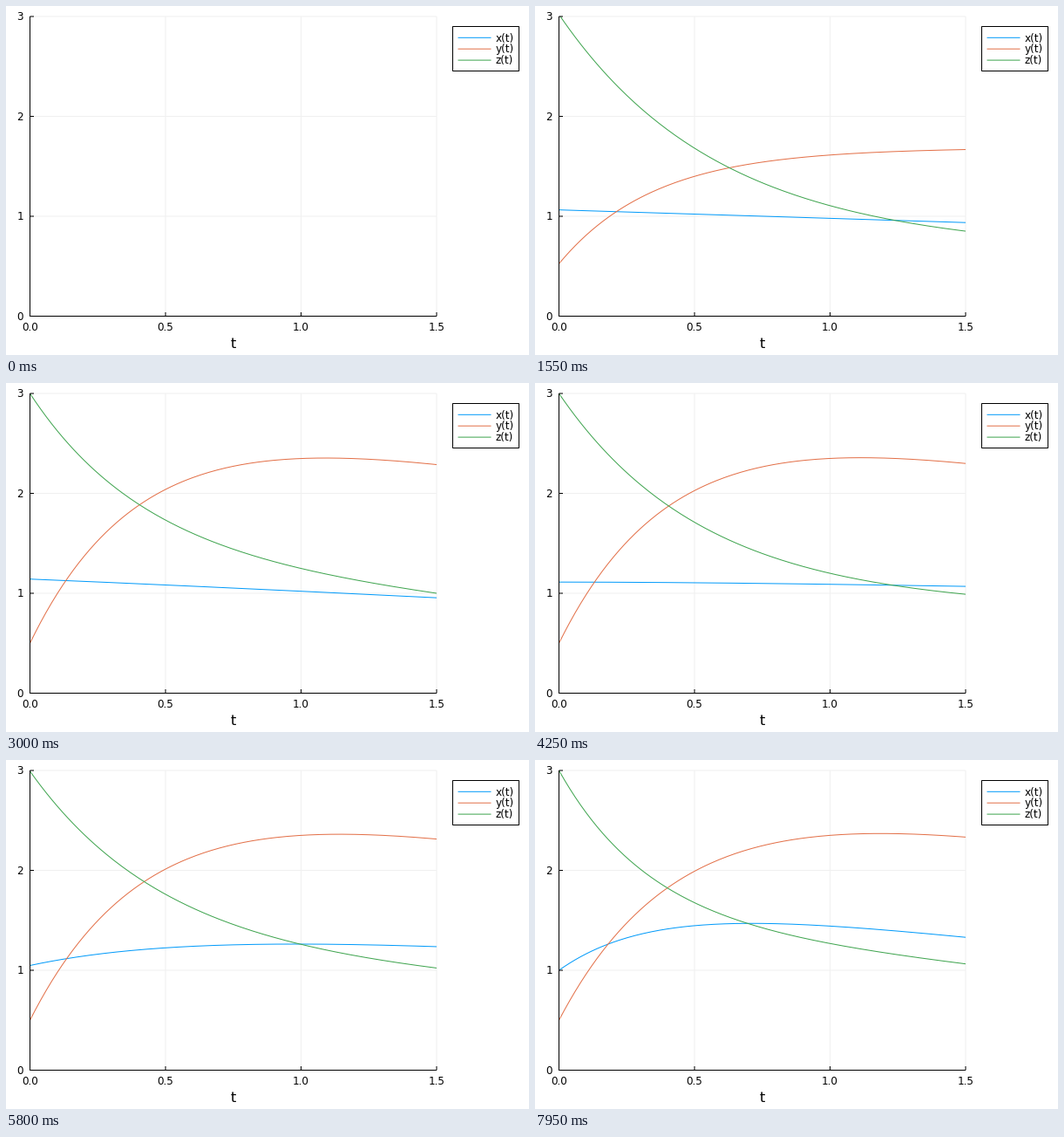
Animation of 600 by 400 pixels, one loop 8 s. Source, as a matplotlib script:

```python
import numpy as np
import matplotlib.pyplot as plt
from matplotlib.animation import FuncAnimation
from matplotlib.patches import Rectangle

W, H, DPI = 600, 400, 100
FRAMES, STEP = 160, 50
LEFT, RIGHT, TOP, BOTTOM = 27.5, 494.0, 12.0, 355.5
PX = 72 / DPI
GRID = "#f0f0f0"
T = np.linspace(0, 1.5, 151)

plt.rcParams["font.family"] = "DejaVu Sans"

# Key moments of the fit: (ms, value at t=0, value at t=1.5, bend, rate)
CURVES = {
    "x(t)": ("#009afa", [(1550, 1.064, 0.937, 0.00, 1.0),
                         (3000, 1.142, 0.955, 0.02, 1.0),
                         (5050, 1.093, 1.142, 0.06, 1.0),
                         (6600, 1.000, 1.337, 0.81, 2.2),
                         (7950, 1.000, 1.330, 0.77, 2.85)]),
    "y(t)": ("#e36f47", [(50, 0.580, 1.600, 1.10, 2.85),
                         (1550, 0.525, 1.668, 1.13, 2.85),
                         (2150, 0.460, 2.030, 1.80, 2.6),
                         (3000, 0.500, 2.288, 2.45, 2.4),
                         (7950, 0.500, 2.333, 2.45, 2.2)]),
    "z(t)": ("#3ea44e", [(1550, 3.020, 0.851, -2.10, 1.735),
                         (3000, 3.000, 1.000, -1.56, 2.4),
                         (4250, 3.000, 0.990, -1.95, 1.9),
                         (5050, 2.990, 1.008, -1.78, 1.7),
                         (7950, 3.000, 1.064, -1.50, 3.0)]),
}


def px(t):
    return LEFT + t / 1.5 * (RIGHT - LEFT)


def py(v):
    return BOTTOM - v / 3 * (BOTTOM - TOP)


def estimate(keys, ms):
    """Straight line from start to end, bowed by an exponential approach."""
    times, *params = np.array(keys).T
    start, end, bend, rate = (np.interp(ms, times, p) for p in params)
    u = T / 1.5
    bow = np.expm1(-rate * T) / np.expm1(-rate * 1.5) - u
    return start + (end - start) * u + bend * bow


fig = plt.figure(figsize=(W / DPI, H / DPI), dpi=DPI, facecolor="white")
ax = fig.add_axes([0, 0, 1, 1])
ax.set_xlim(0, W)
ax.set_ylim(H, 0)
ax.axis("off")


def line(xs, ys, color="black", z=3):
    return ax.plot(xs, ys, color=color, lw=PX, zorder=z, snap=False,
                   solid_capstyle="butt")[0]


def label(x, y, text, size=8.64, ha="center"):
    ax.text(x, y, text, fontsize=size, ha=ha, va="baseline", color="black")


for t in (0, 0.5, 1, 1.5):
    x = px(t)
    if t:
        line([x, x], [TOP, BOTTOM], GRID, 1)
    line([x, x], [BOTTOM, BOTTOM - 4.5])
    label(x, 372, f"{t:.1f}")
for v in range(4):
    y = py(v)
    if v:
        line([LEFT, RIGHT], [y, y], GRID, 1)
    line([LEFT, LEFT + 4.5], [y, y])
    label(20, y + 4.4, str(v), ha="right")
line([LEFT, LEFT], [TOP, BOTTOM + 0.5])
line([LEFT, RIGHT], [BOTTOM, BOTTOM])
label(260.8, 392, "t", 11.6)

ax.add_patch(Rectangle((512.5, 23.5), 76, 51, fc="white", ec="black", lw=PX,
                       snap=False))
plot_area = Rectangle((LEFT, TOP), RIGHT - LEFT, BOTTOM - TOP,
                      transform=ax.transData)
plots = []
for i, (name, (color, keys)) in enumerate(CURVES.items()):
    y = 36.3 + 12.9 * i
    line([518.5, 556.5], [y, y], color)
    label(562, y + 4.2, name, ha="left")
    curve = line(px(T), py(0 * T), color, 2)
    curve.set_clip_path(plot_area)
    plots.append((curve, keys))


def update(i):
    for curve, keys in plots:
        curve.set_visible(i > 0)
        curve.set_ydata(py(estimate(keys, i * STEP)))
    return [curve for curve, _ in plots]


anim = FuncAnimation(fig, update, frames=FRAMES, interval=STEP,
                     repeat=True, repeat_delay=0, blit=False)
plt.show()
```
